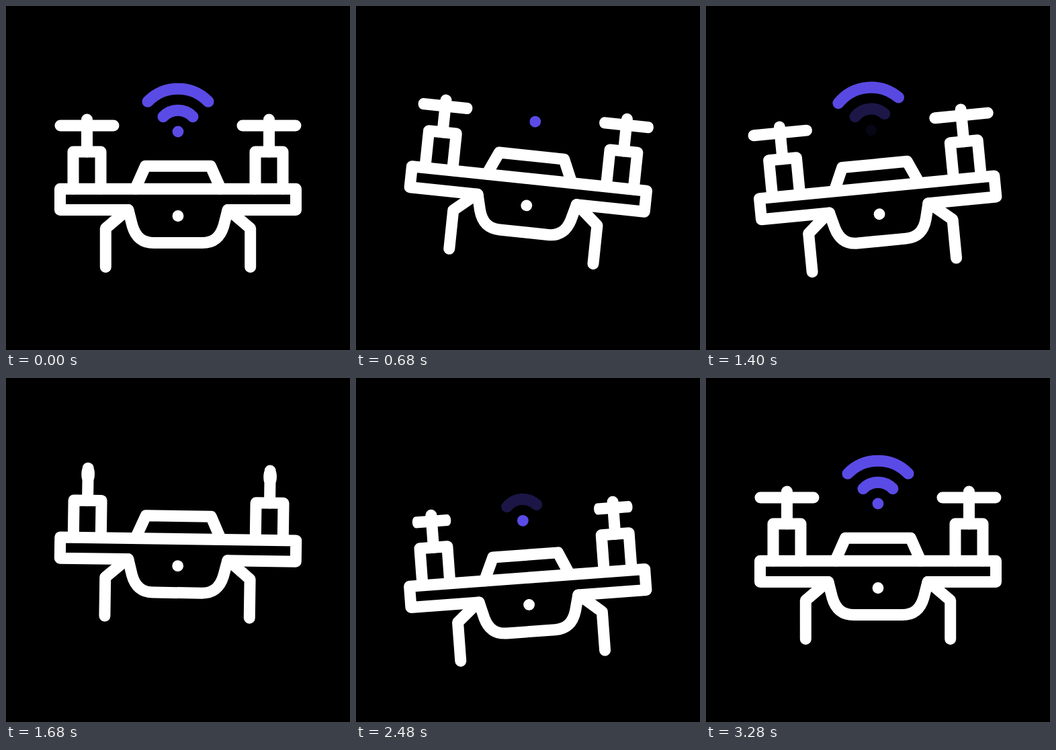
Animation of 512x512 px, one loop 3600 ms. Source, as an HTML page:

```html
<!DOCTYPE html>
<html lang="en">
<head>
<meta charset="utf-8">
<title>Drone</title>
<style>
  html, body { margin: 0; width: 100%; height: 100%; overflow: hidden; background: #000; }
  svg { display: block; width: 100vw; height: 100vh; }
  .line, .signal { fill: none; stroke-width: 17; stroke-linecap: round; stroke-linejoin: round; }
  .line { stroke: #fff; }
  .signal { stroke: #5b4be6; }
</style>
</head>
<body>
<svg viewBox="0 0 512 512">
  <defs>
    <g id="arm">
      <path d="M-20.5 272V217H20.5V272"/>
      <path d="M0 169V217"/>
      <path class="blade" d="M-39.5 178H39.5"/>
    </g>
  </defs>
  <g id="drone">
    <g class="line">
      <path d="M182 303.5H80.5V272.3H431.5V303.5H330"/>
      <path d="M182 303.5L188 327C193 344 203 352.5 220 352.5H292C309 352.5 319 344 324 327L330 303.5"/>
      <path d="M192.5 272L207.5 238.3H304.5L319.5 272"/>
      <path d="M148.3 388.5V331L180 304M363.7 388.5V331L332 304"/>
      <use href="#arm" x="120.5"/>
      <use href="#arm" x="391.5"/>
    </g>
    <circle cx="256" cy="312.5" r="8.4" fill="#fff"/>
    <circle class="wave" cx="256" cy="187" r="8.4" fill="#5b4be6"/>
    <path class="wave signal" d="M234 164.7A30.2 30.2 0 0 1 278 164.7"/>
    <path class="wave signal" d="M211 142.3A62.8 62.8 0 0 1 301 142.3"/>
  </g>
</svg>
<script>
const LOOP = 3600, STEP = 40, END = 3280, SWING = 660;

const linear = s => s;
const smooth = s => s * s * (3 - 2 * s);
const smoother = s => s * s * s * (10 - 15 * s + 6 * s * s);

function valueAt(keys, t, ease) {
  const i = keys.findIndex(([time]) => time > t);
  if (i < 1) return keys.at(i)[1];
  const [t0, a] = keys[i - 1], [t1, b] = keys[i];
  return a + (b - a) * ease((t - t0) / (t1 - t0));
}

// Rocks from side to side, level at both ends of the flight.
function tiltAt(t) {
  const angle = n => n % 5 === 0 ? 0 : n % 2 ? 6 : -6;
  const n = Math.floor(t / SWING);
  return angle(n) + (angle(n + 1) - angle(n)) * smooth(t / SWING - n);
}

const lift = [[0, 0], [420, -33], [1090, 26], [1720, -33], [2490, 25], [3100, 0]];

// Moments when the blades are seen at full width; narrow halfway between.
const turns = [0, 560, 1390, 2000, 2640, END].map((time, i) => [time, i]);
const bladeWidth = t => 0.6 + 0.4 * Math.cos(2 * Math.PI * valueAt(turns, t, linear));

// The signal goes out quickly, then builds up part by part.
function fadeKeys(part) {
  const fadeOut = t => [[t + 27 * part * part, 1], [t + 27 * part * part + 120, 0]];
  const fadeIn = t => [[t + 390 * part, 0], [t + 390 * part + 200, 1]];
  return [...fadeOut(0), ...fadeIn(380), ...fadeOut(1290), ...fadeIn(2030)];
}

const drone = document.getElementById("drone");
const blade = document.querySelector(".blade");
const waves = [...document.querySelectorAll(".wave")]
  .map((node, part) => ({ node, keys: fadeKeys(part) }));

function draw(time) {
  const t = Math.min(END, Math.floor((time % LOOP) / STEP) * STEP);
  drone.setAttribute("transform",
    `translate(0 ${valueAt(lift, t, smoother)}) rotate(${tiltAt(t)} 256 291)`);
  blade.setAttribute("transform", `scale(${bladeWidth(t)} 1)`);
  for (const { node, keys } of waves) node.setAttribute("opacity", valueAt(keys, t, linear));
}

const start = performance.now();
function tick() {
  draw(performance.now() - start);
  requestAnimationFrame(tick);
}
tick();
</script>
</body>
</html>
```
